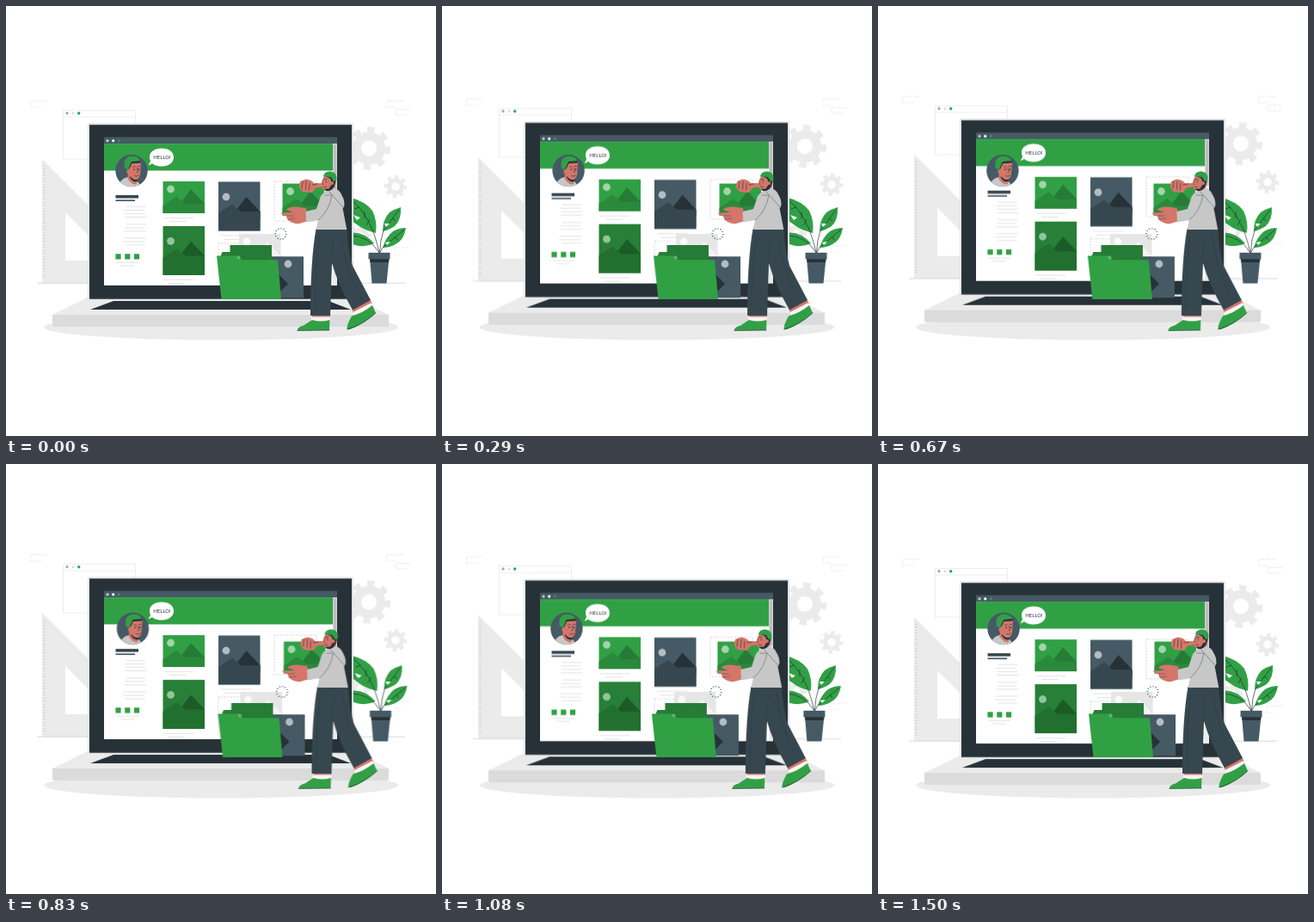
An HTML page that plays this animation: 500x500 px, repeating every 1540 ms.

```html
<!DOCTYPE html>
<html lang="en">
<head>
<meta charset="utf-8">
<title>Portfolio builder</title>
<style>
  html, body { margin: 0; width: 100%; height: 100%; overflow: hidden; background: #fff; }
  svg { display: block; width: 100vw; height: 100vh; }

  .float { animation: float 1540ms -70ms infinite ease-in-out; }
  /* 1500 ms of shaking, then a 40 ms rest */
  .shake { animation: shake 1540ms infinite ease; }
  @keyframes float {
    0%, 100% { transform: translateY(0); }
    50% { transform: translateY(-5.4px); }
  }
  @keyframes shake {
    0%, 97.4%, 100% { transform: translateX(0); }
    9.74%, 87.66% { transform: translateX(-.53px); }
    19.48%, 77.92% { transform: translateX(1.06px); }
    29.22%, 48.7%, 68.18% { transform: translateX(-2.12px); }
    38.96%, 58.44% { transform: translateX(2.12px); }
  }

  .green  { --sky: #31a045; --hill: #2a8a3c; --peak: #267c36; --sun: #a3d4ab; }
  .forest { --sky: #287f38; --hill: #22702f; --peak: #1b5b27; --sun: #93c59b; }
  .slate  { --sky: #455a64; --hill: #37474f; --peak: #263238; --sun: #b4bdc1; }
  .pale   { --sky: #e6e6e6; --hill: #dbdbdb; --peak: #f5f5f5; --sun: #fafafa; }

  .soft { fill: #ebebeb; }
  .wire { fill: none; stroke: #e6e6e6; stroke-width: .7; }
  .gear circle { fill: none; stroke: #ebebeb; }
  .text { fill: none; stroke: #d8d8d8; stroke-width: .7; }
  .slot { fill: none; stroke: #c4c4c4; stroke-width: .7; stroke-dasharray: 2 1.5; }
  .leaf { fill: #31a045; }
  .vein { fill: none; stroke: #263238; stroke-width: .7; }
  .skin { fill: #d4766a; }
  .ink  { fill: #263238; }
  .line { fill: none; stroke: #263238; stroke-width: .6; stroke-linecap: round; stroke-linejoin: round; }
</style>
</head>
<body>
<svg viewBox="0 0 500 500">
  <defs>
    <g id="hills">
      <path d="M18 28 32.5 9 48.5 26V34H18z" fill="var(--peak)"/>
      <path d="M0 28 16 17.500 26 26H48.5V37H0z" fill="var(--hill)"/>
      <circle cx="9" cy="9" r="4.4" fill="var(--sun)"/>
    </g>
    <g id="wide"><rect width="48.5" height="37" fill="var(--sky)"/><use href="#hills"/></g>
    <g id="tall">
      <rect y="-8.5" width="48.5" height="57" fill="var(--sky)"/>
      <rect y="36" width="48.5" height="12.5" fill="var(--hill)"/>
      <use href="#hills"/>
    </g>
    <g id="gear" class="gear">
      <circle r="14" stroke-width="10"/>
      <circle r="21.5" stroke-width="7" pathLength="16" stroke-dasharray="1" stroke-dashoffset=".5"/>
    </g>
    <clipPath id="face"><circle cx="146" cy="191.5" r="18.7"/></clipPath>
  </defs>

  <ellipse class="soft" cx="250" cy="373.5" rx="206" ry="15"/>

  <!-- backdrop -->
  <g class="float">
    <path class="wire" stroke-dasharray="5 1" d="M47 110.5H28.5V118H41M462 110.5H443V118H454M470 120.5H453V127H468M470 281H452V289H459"/>
    <path class="wire" d="M66.5 121.5H150.5V178H66.5zM66.5 129H150.5"/>
    <circle cx="71" cy="124.700" r="1.6" fill="#a6a6a6"/>
    <circle cx="78" cy="124.700" r="1.5" fill="#dbdbdb"/>
    <circle cx="84.700" cy="124.700" r="1.7" fill="#31a045"/>
    <path class="soft" fill-rule="evenodd" d="M42 178V322H186zM69 240V296H125z"/>
    <path d="M44.5 186V319" fill="none" stroke="#bdbdbd" stroke-width="3" stroke-dasharray=".5 3"/>
    <use href="#gear" transform="translate(422 165.5) rotate(6)"/>
    <use href="#gear" transform="translate(453 210) scale(.53) rotate(6)"/>
    <use href="#gear" transform="translate(412 267) scale(.5)"/>
    <path d="M36 322.3H464" stroke="#263238" stroke-width=".18"/>
  </g>

  <!-- plant -->
  <g class="shake">
    <path class="leaf" d="M398 222Q418 227 426 238 432 250 430 264 412 260 398 246zM398 264Q415 261 428 276 415 283 398 275zM459 234Q460 248 452 256 444 261 438 262 438 248 446 240 452 236 459 234zM465 258Q463 272 453 277 446 281 438 281 442 268 450 262 457 258 465 258z"/>
    <path class="vein" d="M400 224Q425 244 434 287M400 267Q422 267 434 287M457 237 439 261Q435 272 434.5 287M463 260 438 281 434.5 287M417 239V247M423 248 419 255M411 234 405 236M449 247 453 250M452 268 455 272"/>
    <path d="M404 243 412 246 408 249zM440 253 446 253 442 257zM441 275 447 274 443 278z" fill="#fff"/>
    <path d="M423 293H445.5L442.5 322.5H425.5z" fill="#455a64"/>
    <path class="ink" d="M423 294H445.5L445 298H423.5z"/>
    <rect x="421.5" y="286.8" width="25" height="7.5" fill="#455a64"/>
  </g>

  <g class="float">
    <!-- laptop -->
    <path class="soft" d="M97 338H403L445 359H54z"/>
    <path fill="#dbdbdb" d="M54 359H445V371Q445 373 443 373H56Q54 373 54 371z"/>
    <path class="ink" d="M98 353 125 343H375L401 353z"/>
    <rect x="95" y="136.3" width="309" height="205.5" rx="1.5" fill="#e3e3e3"/>
    <rect class="ink" x="97" y="138.3" width="305" height="202.5"/>
    <rect x="114" y="153" width="271" height="172" fill="#fff"/>
    <rect x="114" y="153" width="271" height="7.2" fill="#455a64"/>
    <circle cx="118" cy="156.8" r="1.6" fill="#c7c7c7"/>
    <circle cx="124.7" cy="156.8" r="1.6" fill="#fff"/>
    <circle cx="131.3" cy="156.8" r="1.6" fill="#3b8f55"/>
    <rect x="114" y="160.2" width="271" height="31.3" fill="#31a045"/>
    <rect x="380" y="160.2" width="5" height="164.8" fill="#ebebeb"/>
    <rect x="380.5" y="161" width="4" height="53" fill="#bdbdbd"/>

    <!-- page -->
    <path d="M170 183Q168 185 165.5 185 168 182 168 180C164 170 173 165.5 181 165.5 190 165.5 195 170 195 176 195 182 189 186.5 181 186.5 176 186.5 172 185 170 183z" fill="#fff"/>
    <text x="181.5" y="178.2" font-family="Lato, 'Open Sans', sans-serif" font-size="6" fill="#263238" text-anchor="middle">HELLO!</text>
    <rect x="127.5" y="220" width="26.5" height="3.6" fill="#37474f"/>
    <rect x="127.5" y="225.4" width="22.5" height="1.7" fill="#455a64"/>
    <path class="text" d="M140 233.5H162M137 237.5H161M139 241.5H162M138 245.5H163M140 254H162M138 258H161M137 262H163M137 270H163M136 274H161M139 278H162M129 298.5H154M133 302H149"/>
    <path fill="#31a045" d="M127.4 288.3h6.2v6.2h-6.2zM138.2 288.300h6.2v6.2h-6.2zM148.9 288.300h6.2v6.2h-6.2z"/>
    <use href="#wide" class="green" x="182.5" y="204"/>
    <use href="#tall" class="forest" x="182.5" y="264.5"/>
    <use href="#tall" class="slate" x="247" y="213"/>
    <path class="text" d="M184 246.5H218M190 250.5H210M184 318.5H218M188 322.5H208M250 267H286M254 271.5H276"/>
    <rect class="slot" x="312" y="204" width="49" height="46"/>
    <rect class="slot" x="247" y="276" width="49" height="46"/>
  </g>

  <g class="shake">
    <!-- portrait -->
    <circle cx="146" cy="191.5" r="18.7" fill="#455a64"/>
    <g clip-path="url(#face)">
      <path fill="#c7c7c7" d="M130 212Q132 201 141 199L154 205 158 212z"/>
      <path class="skin" d="M142 186 141.5 201Q147 209 152 207L151.5 202Q155 201 156 196L157 182Q153 178 145 180z"/>
      <path class="ink" d="M141 190.500 143.500 189 146.500 183 156.500 182.500V179L142 179zM144.500 198Q148 203.500 154 201.500L151.500 204.500Q146 204 143.800 199z"/>
      <path fill="#31a045" d="M138 189Q135.500 177 144 175 153 173.500 156.500 180L146 181 142 190z"/>
      <circle class="skin" cx="143" cy="192.500" r="2.600"/>
      <path class="line" d="M147.500 187H150M153.500 186.500H155.500M152 188 153.500 193 152 193.500M149.500 197.500Q152 199 154.500 197"/>
      <path class="ink" d="M148.500 189h1v2h-1zM154 189h1v2h-1z"/>
    </g>

    <!-- folder and loader -->
    <use href="#wide" class="pale" x="271" y="265"/>
    <rect x="297.5" y="291.3" width="48.5" height="48" fill="#455a64"/>
    <path class="ink" d="M310 317 316 311 328 323 316 335z"/>
    <circle cx="328" cy="300" r="4.4" fill="#b4bdc1"/>
    <path fill="#287f38" d="M249 292 251.500 286H268L273 292V300H249z"/>
    <rect x="260.5" y="278" width="48.5" height="30" fill="#267c36"/>
    <path fill="#31a045" d="M245 290.5H270.5L274 295.3H316L320 341H250.5z"/>
    <circle cx="270.5" cy="292.5" r="2" fill="#62b672"/>
    <circle cx="319.5" cy="265" r="6.3" fill="none" stroke="#455a64" stroke-width="1.6" pathLength="42" stroke-dasharray="1 2.5"/>

    <!-- legs -->
    <path class="skin" d="M356 357H377V363H356zM402 351 423 341 426 346 404 357z"/>
    <path fill="#f5f5f5" d="M355 361.500H377V368H355zM403.500 356 425 345 428 352 405 363z"/>
    <path class="leaf" d="M338.500 377.500Q339 373 346 371.500L356 365Q366 368 376.500 365L376 377zM396.500 376Q396 371 402 360.500 415 357 426 348L430 357Q416 370 400 376z"/>
    <path class="line" d="M339 377.500 376 377M397 376Q416 370 430 357"/>
    <path fill="#37474f" d="M360.500 259H396.300Q398 285 403 302L424 342 403 353.500Q386 324 379 299L377 360H354Q354 295 360.500 259z"/>
    <path class="line" d="M379 299Q377 286 381 271M364 268Q359 306 359 352M390 266Q393 302 413 341" stroke-opacity=".5"/>

    <!-- carried picture and body -->
    <use href="#wide" class="green" x="321.5" y="206.5"/>
    <path class="skin" d="M349 235 338 233.500Q328 233 326 237L334 240 320 240.500Q320 243 326 244L327 248Q333 254 341 253L351 250z"/>
    <path class="line" d="M326 244 334 244M328 248 336 247" stroke-opacity=".6"/>
    <path class="skin" d="M369.500 198 367 206.500 368.500 213Q370 214.500 372.500 214.500L372 219 381 219 383.500 204 381 197z"/>
    <path class="ink" d="M371.500 198 382 198 383.500 204 382 209 378.500 215.500 371 214.500 370 212.700 375.500 212.500 379.200 206.500 377 200.500z"/>
    <path class="leaf" d="M369 198Q370 192.500 377 192.300 385.500 193 384.500 202.500L381 204 378 199z"/>
    <circle class="skin" cx="379" cy="206" r="2.100"/>
    <path class="line" d="M370 201.300H373M368.800 202 367.300 206.800 369 207.200M372.300 203V205M369.500 210.300H372.500"/>
    <path class="skin" d="M368 206 358 206Q355 201.500 348 201.500L342 204 340.500 211 345 216 356 217 360 211.500 368 210.500z"/>
    <path class="line" d="M345 204 344 212M349 204 348.500 213M353 206 352.500 214M356 208 361 207"/>
    <path fill="#c7c7c7" d="M371 215.500Q377 216 381 211.500 388 213 391 221 394.500 227 393 234L391.500 235 396.300 260H360.500L363 249 349 251.500 348.500 239 361 236 366 221z"/>
    <path class="line" d="M371 220 379 220Q376 238 363 249M376 216 391 233 393 234" stroke-opacity=".65"/>
  </g>
</svg>
</body>
</html>
```
